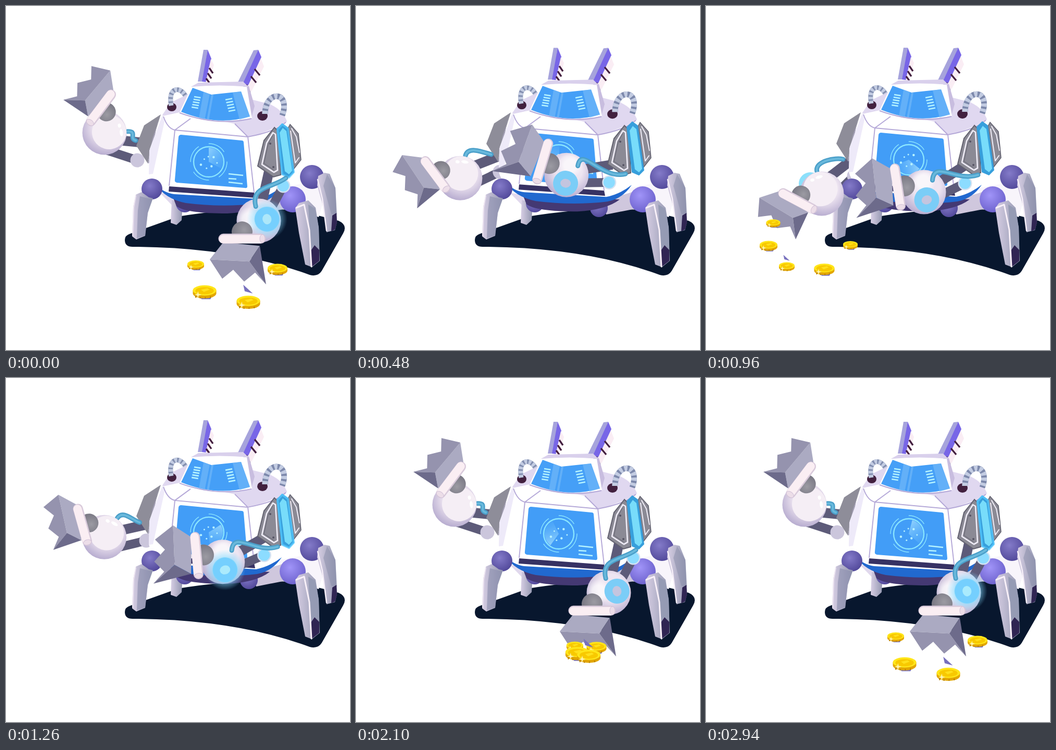
Write an HTML page that moves like this. It is 660 by 660 pixels and loops after 3 s.

```html
<!DOCTYPE html>
<html lang="en">
<head>
<meta charset="utf-8">
<title>Mining robot</title>
<style>
html, body { margin: 0; width: 100%; height: 100%; overflow: hidden; background: #fff; }
svg { display: block; width: 100vw; height: 100vh; }
.line { fill: none; stroke-linecap: round; stroke-linejoin: round; }
.tube { stroke: #5d5b79; fill: none; }
.seam { fill: none; stroke: #b5a9d8; stroke-width: 2; }
.lamp { fill: none; stroke: #b5f3ff; stroke-width: 2.6; }
.dark { fill: none; stroke: #43203f; stroke-width: 3.4; }
</style>
</head>
<body>
<svg viewBox="0 0 660 660">
<defs>
  <radialGradient id="violet" cx=".4" cy=".35" r=".7"><stop offset="0" stop-color="#847bc9"/><stop offset="1" stop-color="#504799"/></radialGradient>
  <radialGradient id="bright" cx=".4" cy=".35" r=".7"><stop offset="0" stop-color="#a094f8"/><stop offset="1" stop-color="#6b60cb"/></radialGradient>
  <radialGradient id="ball" cx=".56" cy=".38" r=".66"><stop offset=".45" stop-color="#eee5f1"/><stop offset="1" stop-color="#b3a8cd"/></radialGradient>
  <radialGradient id="shine"><stop offset=".5" stop-color="#fff"/><stop offset="1" stop-color="#fff" stop-opacity="0"/></radialGradient>
  <radialGradient id="halo"><stop offset=".4" stop-color="#86dbff"/><stop offset="1" stop-color="#86dbff" stop-opacity="0"/></radialGradient>
  <radialGradient id="steel" cx=".4" cy=".4" r=".7"><stop offset="0" stop-color="#9c9ba3"/><stop offset="1" stop-color="#73727e"/></radialGradient>
  <linearGradient id="leg"><stop offset="0" stop-color="#d8cfe5"/><stop offset=".5" stop-color="#b5b3ca"/><stop offset="1" stop-color="#9296b0"/></linearGradient>
  <linearGradient id="sweep" x1="0" y1="0" x2=".9" y2="1"><stop offset="0" stop-color="#a9e2ff" stop-opacity=".75"/><stop offset="1" stop-color="#6ec2ff" stop-opacity=".15"/></linearGradient>
  <g id="coin">
    <path d="M-16-1v4a16 7 0 0 0 32 0v-4z" fill="#e3a700"/>
    <path d="M-12 6v3M-6 8v2M1 8v2M8 7v2" stroke="#b98100" stroke-width="1.5"/>
    <ellipse cy="-1" rx="16" ry="7" fill="#ffe61a"/>
    <ellipse cy="-.5" rx="12.5" ry="5" fill="#f8c900"/>
    <path d="M-5-2l9-2 3 2-8 3z" fill="#ffe01c"/>
    <path d="M-9 0l1 4 4 1-4 1-1 4-1-4-4-1 4-1z" fill="#fff4b3"/>
  </g>
</defs>

<path fill="#08172e" d="M238 437L330 404Q450 384 560 392L638 412Q656 420 647 436L607 506Q600 520 583 516Q440 463 243 462Q228 462 228 449Q228 440 238 437Z"/>

<g id="legs">
  <path fill="#e1d9ed" d="M295 358L325 364L345 382L322 386Z"/>
  <path fill="url(#leg)" d="M318 372L339 378L337 411L327 420L316 416Z"/>
  <circle cx="343" cy="379" r="17" fill="url(#violet)"/>
  <path fill="#f8f5fb" d="M520 350L588 337L612 365L600 405L550 392Z"/>
  <path fill="#cfc7dd" d="M472 374L530 357L541 388L480 400Z"/>
  <circle cx="466" cy="388" r="17" fill="url(#violet)"/>
  <circle cx="587" cy="328" r="23" fill="url(#violet)"/>
  <path fill="url(#leg)" d="M599 326L611 320L621 322L632 349L635 415L631 430L615 434L610 390L597 344Z"/>
  <path fill="#8d91ab" d="M616 323L632 349L635 400L624 399L609 345Z" opacity=".55"/>
  <path fill="#302553" d="M626 402L634 397L635 416L631 429L624 432Z"/>
  <path class="line" stroke="#f6eff8" stroke-width="2.5" d="M598 333L607 370L615 431"/>
  <circle cx="550" cy="371" r="25" fill="url(#bright)"/>
  <path fill="url(#leg)" d="M555 388L562 378L580 373L594 387L600 425L602 489L587 501L574 496L562 435Z"/>
  <path fill="#959bb4" d="M580 381L593 389L600 425L601 466L590 459L585 470Z"/>
  <path fill="#302553" d="M592 459L601 468L601 489L587 500L583 472Z"/>
  <path class="line" stroke="#f8f0f8" stroke-width="3" d="M557 387L572 381L582 430L586 500"/>
</g>

<g id="leftTubes"></g>

<g id="body">
  <path fill="#8e8d99" d="M297 204L265 225L250 264L272 298L281 255Z"/>
  <path fill="#a39fb5" d="M297 204L290 222L276 297L272 298L281 250Z"/>
  <path fill="#e0d8f0" d="M300 205L316 181L352 164L466 174L505 184Q532 195 540 220L466 250L322 236Z"/>
  <path fill="#fff" d="M300 206Q312 230 324 234L464 247Q515 238 540 217L549 235L546 300Q537 330 500 368L320 364Q280 345 274 318L276 270Z"/>
  <path fill="#fff" d="M301 207L333 200L439 222L464 247L324 235Q307 228 301 207Z"/>
  <path fill="#eeeaf9" d="M300 206L304 218L282 318L274 319L275 273Z"/>
  <path fill="#443973" d="M320 362L506 371Q480 391 425 394Q345 394 327 380Z"/>
  <path fill="#2169cf" d="M287 338Q303 355 323 357L480 366Q506 361 529 343Q511 370 482 375Q415 383 345 374Q305 366 287 338Z"/>
  <path fill="#373263" d="M313 342L476 354L478 364L312 352Z"/>
  <path class="seam" d="M302 208Q310 231 324 234L464 247Q515 238 537 219M324 234L313 341M464 247L476 354M324 234L354 212M464 247L439 222"/>
  <path fill="#429df7" d="M336 243L452 254Q456 254 456 258L463 342Q463 346 458 345L328 335Q323 334 324 329L331 247Q332 243 336 243Z"/>
  <g class="line" stroke="#8be7ff">
    <circle cx="389" cy="295" r="29" stroke-width="2.3"/>
    <circle cx="389" cy="295" r="35" stroke-width="1.4" stroke-dasharray="34 21"/>
  </g>
  <g transform="translate(389 295)">
    <path id="radar" fill="url(#sweep)" d="M0 0V-27A27 27 0 0 1 24 13Z"/>
    <g id="dots" fill="#b8f3ff"></g>
  </g>
  <path class="lamp" d="M427 318L455 321M427 327L442 328M427 334L454 337"/>

  <path fill="#a6a3dc" d="M379 80L387 80L378 141L368 141Z"/>
  <path fill="#7866e7" d="M387 80L394 97L384 142L376 141Z"/>
  <path fill="#faedf4" d="M393 98L399 109L388 146L383 143Z"/>
  <path class="dark" d="M390 115L397 125M387 125L394 135M384 135L390 143"/>
  <path fill="#a6a3dc" d="M475 81L484 80L458 145L445 142Z"/>
  <path fill="#7866e7" d="M484 80L490 94L465 148L454 146Z"/>
  <path fill="#faedf4" d="M489 97L495 112L471 160L463 152Z"/>
  <path class="dark" d="M477 117L487 129M470 131L480 143M461 147L468 162"/>
  <path fill="#c8bddf" d="M455 144L466 150L477 188L470 213L457 170Z"/>
  <path fill="#fff" d="M356 151L462 151L472 211Q405 226 333 200Z"/>
  <path fill="#d9d0ec" d="M355 151L369 143L455 141L465 151Q410 146 355 151Z"/>
  <path fill="#459ff7" d="M358 153L394 166L451 160L468 208Q405 227 336 199Z"/>
  <path fill="#78bcfa" opacity=".6" d="M379 161L391 165L381 215L370 212ZM394 166L398 166L389 216L385 215ZM435 162L451 160L468 208L448 214Z"/>
  <path class="lamp" id="eyes"/>
  <path class="seam" d="M333 201Q405 227 471 212"/>
  <ellipse cx="318" cy="190" rx="9" ry="8" fill="#42213f"/>
  <ellipse cx="492" cy="207" rx="10" ry="9" fill="#42213f"/>
  <g fill="none">
    <path stroke="#838fb0" stroke-width="9" d="M317 187C310 151 334 150 344 168"/>
    <path stroke="#c3cce2" stroke-width="9" stroke-dasharray="5 3" d="M317 187C310 151 334 150 344 168"/>
    <path stroke="#7d89ac" stroke-width="11" d="M497 203C497 157 547 158 530 206"/>
    <path stroke="#c3cce2" stroke-width="11" stroke-dasharray="6 4" d="M497 203C497 157 547 158 530 206"/>
  </g>
</g>

<g id="frontLeg">
  <circle cx="280" cy="351" r="20" fill="url(#violet)"/>
  <path fill="url(#leg)" d="M249 362L260 357L274 367L282 369L272 397L267 441L250 448L242 442L244 386Z"/>
  <path fill="#8e91b0" opacity=".65" d="M257 365L280 371L272 397L267 440L251 446L253 392Z"/>
  <path class="line" stroke="#eee6f2" stroke-width="2" d="M249 364L245 386L243 440"/>
</g>

<g id="leftHand"></g>
<g id="rightTubes"></g>

<g id="panel">
  <path fill="#8b8a95" stroke="#62616f" stroke-width="2" d="M515 229L495 254L483 303L513 324L527 320L523 237Z"/>
  <path class="line" stroke="#f0edf7" stroke-width="2.6" d="M512 239L500 259L491 300L514 315L521 311L517 242Z"/>
  <path class="line" stroke="#62616f" d="M511 245L503 261L495 298L513 310"/>
  <circle cx="507" cy="260" r="2" fill="#555363"/><circle cx="513" cy="305" r="2" fill="#555363"/>
  <path fill="#8b8a95" stroke="#62616f" stroke-width="1.5" d="M545 223L541 231L552 309L566 291L561 241Z"/>
  <path class="line" stroke="#f0edf7" stroke-width="2" d="M546 236L555 297L562 287M548 231L557 247L563 277"/>
  <path fill="#379fdc" d="M530 221L519 232L529 319L543 325L553 315L541 229Z"/>
  <path fill="#78dcfa" d="M531 230L525 239L535 313L543 319L549 312L538 236Z"/>
  <path id="panelGlow" class="line" stroke="#54c8ff" stroke-width="4" d="M530 223L521 233L530 319L543 325L552 315L541 231Z"/>
</g>
<g id="rightHand"></g>
<g id="coins"></g>
</svg>

<script>
const $ = id => document.getElementById(id);
const clamp = v => Math.min(1, Math.max(0, v));
const ramp = (t, from, to) => clamp((t - from) / (to - from));
const bump = (t, mid, half) => clamp(1 - Math.abs(t - mid) / half);
const polar = ([x, y], r, deg) => [x + r * Math.cos(deg * Math.PI / 180), y + r * Math.sin(deg * Math.PI / 180)];
const shift = ([x, y], dx, dy) => [x + dx, y + dy];
const SWING = 750, CYCLE = 1500, STEP = 60, LOOP = 3000;

// Swing u: 0 is the pose at loop start, 1 the opposite end of the stroke.
function leftArm(u) {
  const angle = 217 - 99 * u;
  const ball = [189 - 39 * u + 72 * u * u, 243 + 117 * u];
  const shoulder = [262 + 14 * u, 262 + 36 * u];
  const plug = polar(ball, 44, angle - 220);
  const end = shift(shoulder, -13, -4);
  return {
    angle, ball, shoulder,
    roll: angle - 224,
    wrist: polar(ball, 48, angle + 45),
    elbow: [252 + 32 * u, 296 + 30 * u],
    upper: polar(ball, 30, angle - 188),
    lower: polar(ball, 32, angle - 125),
    hose: [plug, polar(plug, 20, angle - 220), shift(end, -14, -4), end]
  };
}

function rightArm(u) {
  const angle = 90 + 81 * u;
  const ball = [485 - 84 * u + 17 * u * u, 412 - 19 * u - 36 * u * u];
  const plug = polar(ball, 28, 48 * u - 102);
  return {
    angle, ball,
    roll: angle - 101,
    wrist: polar(ball, 47 + 4 * u, 133 + 58 * u),
    shoulder: [505 - 10 * u, 315 - 8 * u],
    elbow: [532 - 35 * u, 345 - 5 * u],
    upper: polar(ball, 36, 47 * u - 80),
    lower: polar(ball, 34, 54 * u - 45),
    hose: [plug, shift(plug, 13 * u - 10, -39), [510 - 30 * u, 350 - 12 * u], [537 - 15 * u, 330 - 6 * u]]
  };
}

// Three plates with a zigzag edge, plus the wrist bar.
function claw({ top, low, ridge, corner, tip, grow, notch, from, half, dome }) {
  const teeth = Array.from({ length: 5 }, (_, i) => [tip + grow * i - (i % 2) * notch, from - 21 * i]);
  const poly = (fill, ...pts) => `<polygon fill="${fill}" points="${pts.join(' ')}"/>`;
  return `<circle cx="-13" r="${dome}" fill="url(#steel)"/>`
    + poly('#abaac2', top, low, ridge, corner)
    + poly('#9593ae', ridge, corner, ...teeth)
    + poly('#6d6b8b', low, ridge, teeth[4])
    + `<path class="line" stroke="#d9cadb" stroke-width="19" d="M0 ${-half}V${half}"/>
       <path class="line" stroke="#faeef3" stroke-width="16" d="M1 ${-half}V${half}"/>
       <ellipse cy="${-half - 3}" rx="8" ry="5" fill="#ecdde8" stroke="#d0c0d6"/>`;
}
const leftClaw = claw({ top: [-1, 39], low: [10, -28], ridge: [33, -7], corner: [29, 68],
  tip: 63, grow: 1, notch: 16, from: 53, half: 32, dome: 18 });
const rightClaw = claw({ top: [7, 36], low: [14, -34], ridge: [44, -14], corner: [40, 62],
  tip: 77, grow: 2.7, notch: 20, from: 38, half: 36, dome: 20 });

const tubes = (name, fill) => `<path class="tube" id="${name}Upper" stroke-width="19"/>
  <path class="tube" id="${name}Lower" stroke-width="17"/><circle id="${name}Elbow" r="13.5" fill="${fill}"/>`;
const hose = name => `<path class="line" id="${name}Hose" stroke="#4b9fc9" stroke-width="9"/>
  <path class="line" id="${name}HoseLight" stroke="#69b9dc" stroke-width="4"/>`;

$('leftTubes').innerHTML = tubes('left', '#cbc6dc');
$('rightTubes').innerHTML = tubes('right', '#d5e2f2') + '<circle id="elbowLight" r="11" fill="#8cdcff"/>';
$('leftHand').innerHTML = hose('left') + `
  <circle id="leftDisc" r="22" fill="#8ce0fb"/>
  <circle id="leftBall" r="42.5" fill="url(#ball)"/>
  <g id="leftShine"><circle cx="9" r="33" fill="#f5eef5"/>
    <ellipse cx="32" cy="4" rx="3" ry="7" fill="#fff"/><ellipse cx="30" cy="-10" rx="3" ry="4" fill="#fff"/></g>
  <g id="leftClaw">${leftClaw}</g>`;
$('rightHand').innerHTML = `
  <circle id="rightBall" r="42.5" fill="url(#ball)"/>
  <g id="rightShine"><circle cx="-19" cy="-6" r="24" fill="url(#shine)" opacity=".65"/>
    <circle cx="16" r="24" fill="#7bcdf7"/><ellipse cx="16" rx="8.5" ry="10" fill="#c4c5df"/>
    <g id="glow"><circle cx="16" r="39" fill="url(#halo)"/><circle cx="16" r="23" fill="#75d0ff"/>
      <ellipse cx="16" rx="8.5" ry="10" fill="#a9eeff"/></g></g>
  ${hose('right')}<g id="rightClaw">${rightClaw}</g>`;

const rows = (x, y, dx, dy, w, h) => Array.from({ length: 5 }, (_, i) => `M${x + dx * i} ${y + dy * i}l${w} ${h}`).join('');
$('eyes').setAttribute('d', rows(361, 170, -1.2, 5, 12.5, 2) + rows(421, 176, 1.5, 5.5, 13, -2.5));
$('dots').innerHTML = Array.from({ length: 7 }, (_, i) => {
  const [x, y] = polar([0, 0], 10 + i % 3 * 3, i * 51 - 95);
  return `<circle cx="${x}" cy="${y}" r="${1.5 + i % 2 * .7}"/>`;
}).join('');

// Each throw scatters coins from an impact point; coins are x, y, radius.
const throws = [
  { home: [440, 520], start: 585, seen: 690, end: 800, drift: 0,
    coins: [[364, 496, 16], [521, 504, 19], [381, 547, 22.5], [465, 567, 22.5]] },
  { home: [185, 455], start: 160, seen: 210, end: 400, drift: .003,
    coins: [[129, 416, 13.5], [120, 459, 17], [277, 458, 14], [155, 499, 15], [227, 504, 19.5]] }
];
const coinGroup = ({ coins }) => `<g>${coins.map((_, i) =>
  `<g><path fill="#7770bd" d="${i === 3 ? 'M-5-14L-7-23L6-11Z' : 'M-8 7L-4 11L8 11L11 5Z'}"/><use href="#coin"/></g>`).join('')}</g>`;
$('coins').innerHTML = throws.map(coinGroup).join('');

const at = (id, [x, y], turn = 0) => $(id).setAttribute('transform', `translate(${x} ${y}) rotate(${turn})`);

function drawArm(name, arm) {
  const path = (part, d) => $(name + part).setAttribute('d', d);
  at(name + 'Ball', arm.ball);
  at(name + 'Shine', arm.ball, arm.roll);
  at(name + 'Claw', arm.wrist, arm.angle);
  at(name + 'Elbow', arm.elbow);
  path('Upper', `M${arm.upper}L${arm.shoulder}`);
  path('Lower', `M${arm.lower}L${arm.elbow}`);
  const curve = `M${arm.hose[0]}C${arm.hose.slice(1)}`;
  path('Hose', curve);
  path('HoseLight', curve);
}

function drawThrow({ home, start, seen, end, drift, coins }, group, swing) {
  const t = swing + SWING < end ? swing + SWING : swing;
  const shown = t > start && t < end;
  group.setAttribute('visibility', shown ? 'visible' : 'hidden');
  if (!shown) return;
  const spread = 1 - (1 - ramp(t, start, seen)) ** 2 + drift * Math.max(0, Math.min(60, t - seen));
  coins.forEach(([x, y, r], i) => {
    const cx = home[0] + (x - home[0]) * spread, cy = home[1] + (y - home[1]) * spread;
    group.children[i].setAttribute('transform', `translate(${cx} ${cy}) scale(${r / 16})`);
  });
}

function draw(time) {
  const t = Math.floor((time % LOOP) / STEP) * STEP;
  const swing = t % SWING, cycle = t % CYCLE;
  const leftU = ramp(swing, 75, 165) - ramp(swing, 444, 585);
  const rightU = ramp(swing, 60, 165) + .32 * bump(swing, 480, 35) - ramp(swing, 510, 590);
  const left = leftArm(leftU), right = rightArm(rightU);
  const lift = 4 * (1 - leftU) ** 2 - 4 * bump(swing, 140, 60);
  at('body', [0, lift]);
  at('panel', [0, lift]);
  drawArm('left', left);
  drawArm('right', right);
  const reach = ramp(leftU, .75, 1);
  at('leftDisc', shift(left.ball, -22 * reach, -19 * reach));
  at('elbowLight', right.elbow);
  at('radar', [0, 0], -360 * cycle / CYCLE);
  const glow = clamp(Math.cos((cycle - 1360) / CYCLE * 2 * Math.PI));
  $('glow').setAttribute('opacity', glow);
  $('panelGlow').setAttribute('opacity', glow * .8);
  throws.forEach((item, i) => drawThrow(item, $('coins').children[i], swing));
}

const begin = performance.now();
function tick() {
  draw(performance.now() - begin);
  requestAnimationFrame(tick);
}
tick();
</script>
</body>
</html>
```
